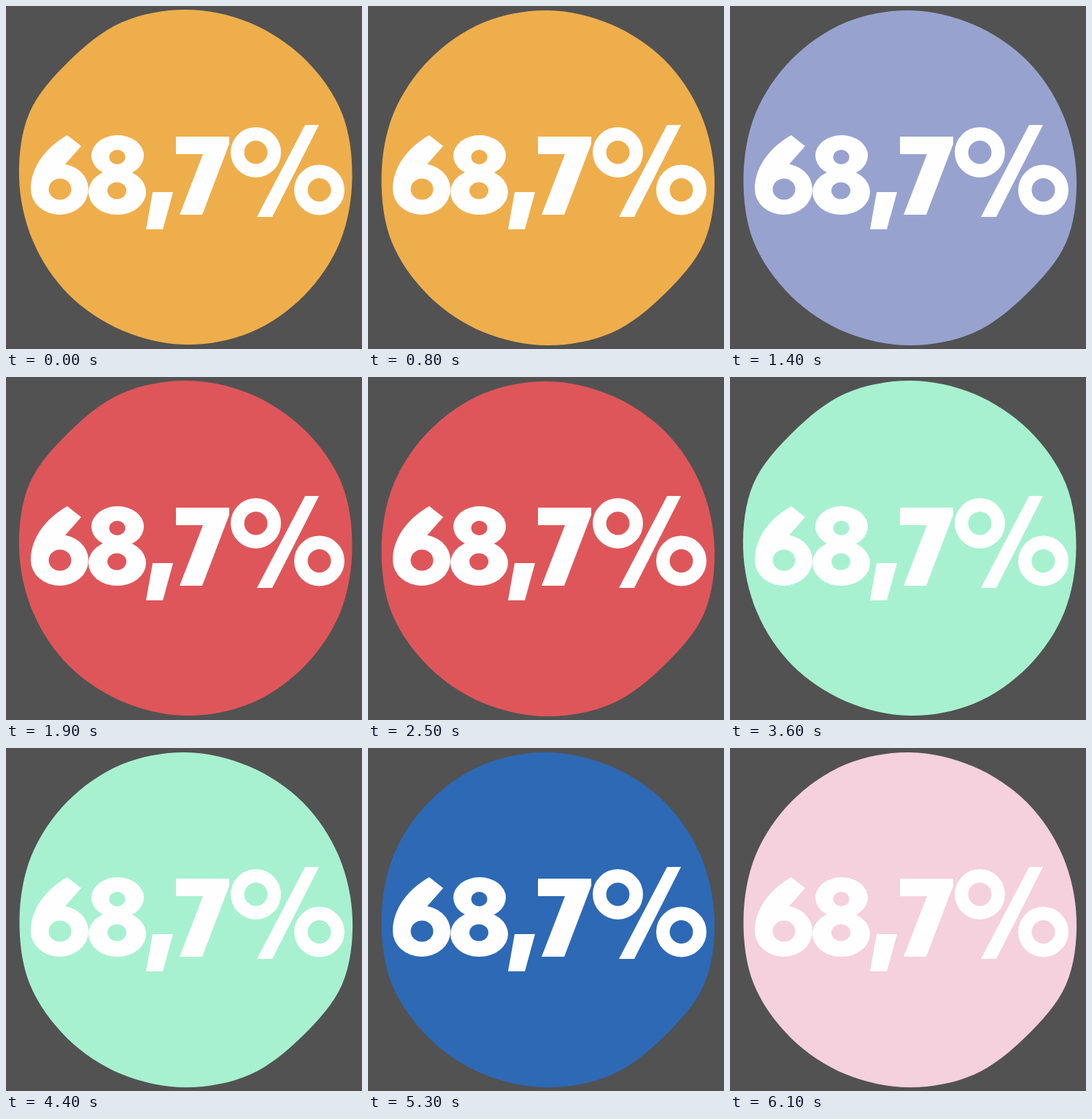
Write an HTML page that moves like this. It is 488x470 px and loops after 6200 ms.

```html
<!DOCTYPE html>
<html lang="de">
<head>
<meta charset="utf-8">
<title>68,7%</title>
<style>
  html, body { margin: 0; width: 100%; height: 100%; overflow: hidden; background: #525252; }
  svg { display: block; width: 100%; height: 100%; }
  .label { font: 900 148px Lato, sans-serif; fill: transparent; }
  .ink { fill: #fefefe; }
  .hole { fill: currentColor; }
  .ring { fill: none; stroke: #fefefe; stroke-width: 18.5px; }
</style>
</head>
<body>
<svg id="stage" viewBox="0 0 488 470">
  <rect width="488" height="470" fill="#525252"/>
  <path id="blob" class="hole"/>
  <!-- selectable label under the drawn lettering -->
  <text class="label" x="30" y="286">68,7%</text>
  <g class="ink">
    <path d="M34 251C34 219 56 193 84 177L103 192L81 217L74 251Z"/>
    <ellipse cx="73.5" cy="251" rx="39.5" ry="35"/>
    <ellipse cx="153" cy="205" rx="36" ry="28"/>
    <ellipse cx="152.5" cy="255" rx="39.5" ry="31"/>
    <path d="M201 255H229L215 306H192Z"/>
    <path d="M233 179H306V189L269 286H238L270 203H233Z"/>
    <path d="M410 163H429L365 289H344Z"/>
  </g>
  <g class="hole">
    <ellipse cx="74" cy="251" rx="15.5" ry="14.5"/>
    <ellipse cx="152.5" cy="207" rx="11" ry="10"/>
    <ellipse cx="152" cy="253" rx="13" ry="11.5"/>
  </g>
  <g class="ring">
    <circle cx="342.5" cy="200.5" r="25.2"/>
    <circle cx="429.5" cy="252" r="25.2"/>
  </g>
</svg>
<script>
const LOOP = 6200, TICK = 100;
const colors = ['#eeae4c', '#97a2cf', '#de565a', '#f9ee7e', '#a7f1d0', '#2e69b5', '#f5d0dd'];

// hand-cut circle: radius offsets at equal angles, clockwise from the right
const CX = 246.5, CY = 235, R = 228;
const bumps = [0, 1, 1, 2, 1, -1, -1, -1, 0.5, 4, -2, 2, 2, 1.5, 2, 3.5];

function corner(i) {
  const n = bumps.length, k = (i + n) % n;
  const angle = k / n * 2 * Math.PI, r = R + bumps[k];
  return [CX + r * Math.cos(angle), CY + r * Math.sin(angle)];
}

// closed Catmull-Rom curve through the corners
function outline() {
  let d = 'M' + corner(0);
  for (let i = 0; i < bumps.length; i++) {
    const [a, b, c, e] = [-1, 0, 1, 2].map(k => corner(i + k));
    const p = b.map((v, j) => v + (c[j] - a[j]) / 6);
    const q = c.map((v, j) => v - (e[j] - b[j]) / 6);
    d += `C${p} ${q} ${c}`;
  }
  return d + 'Z';
}

const stage = document.getElementById('stage');
const blob = document.getElementById('blob');
blob.setAttribute('d', outline());

// every colour is held for two poses; the second is turned by half
function draw(ms) {
  const t = Math.floor(ms % LOOP / TICK) * TICK;
  const pose = Math.floor(t / LOOP * colors.length * 2);
  blob.setAttribute('transform', `rotate(${pose % 2 * 180} ${CX} ${CY})`);
  stage.style.color = colors[pose >> 1];
}

const start = performance.now();
function frame() {
  draw(performance.now() - start);
  requestAnimationFrame(frame);
}
frame();
</script>
</body>
</html>
```
